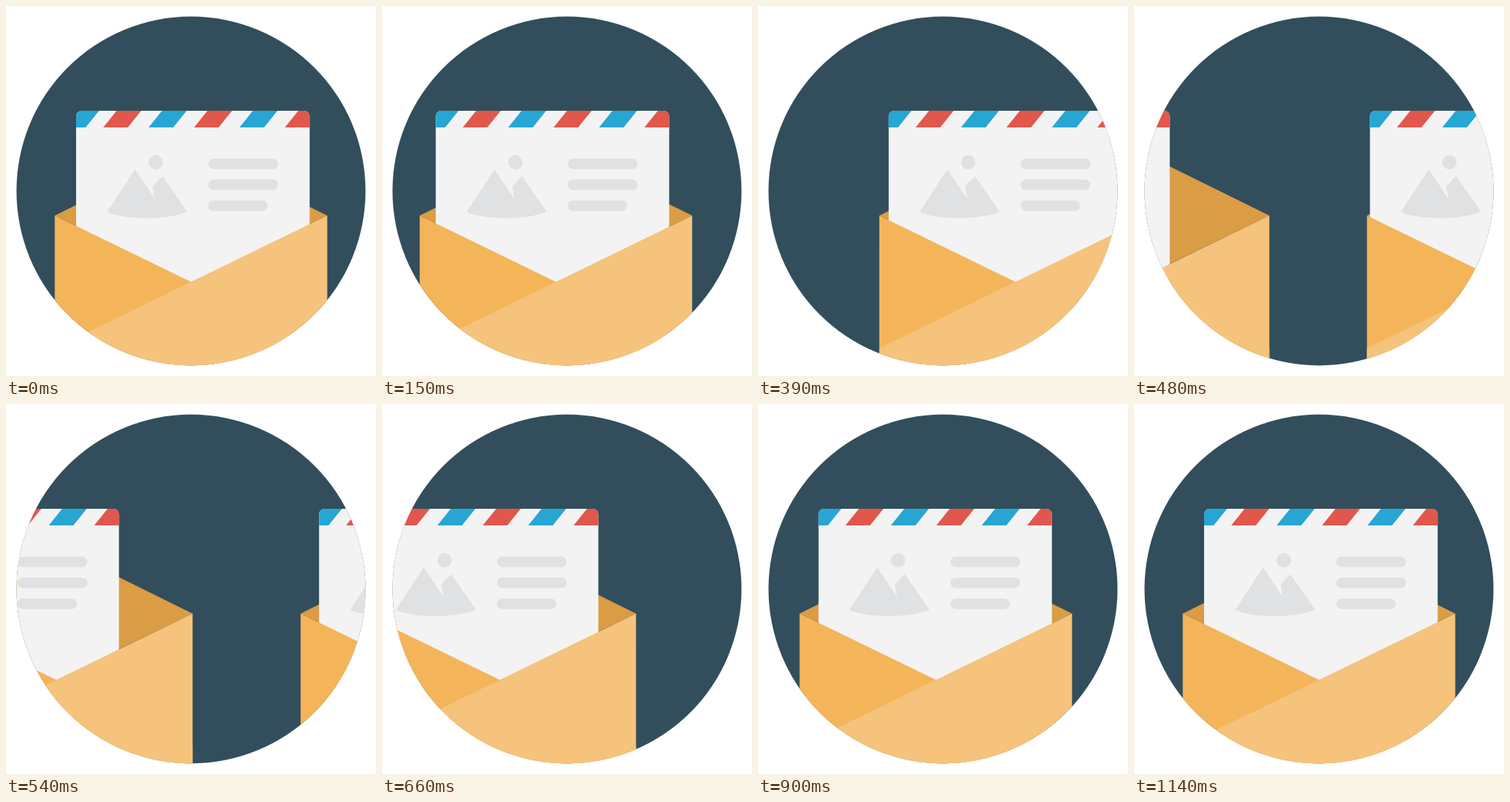
Recreate the animation shown at these times as an HTML page. Size 512x512 px, loop 2.14 s.

```html
<!DOCTYPE html>
<html lang="en">
<head>
<meta charset="utf-8">
<title>Letter in an envelope</title>
<style>
  html, body { margin: 0; width: 100%; height: 100%; overflow: hidden; background: #fff; }
  svg { display: block; width: 100%; height: 100%; }
</style>
</head>
<body>
<svg viewBox="0 0 512 512">
  <defs>
    <clipPath id="disc"><circle cx="256" cy="256" r="241.5"/></clipPath>
    <clipPath id="sheet"><path d="M97 400V153a8 8 0 0 1 8-8H412.2a8 8 0 0 1 8 8V400z"/></clipPath>
    <path id="back" fill="#da9c45" d="M67.5 290L256 197L444.5 290L256 381z"/>
    <g id="front">
      <path fill="#f4b459" d="M67.5 290L444.5 473.5V500H67.5z"/>
      <path fill="#f5c37b" d="M67.5 473.5L444.5 290V500H67.5z"/>
    </g>
    <g id="card">
      <g clip-path="url(#sheet)">
        <rect x="96" y="144" width="325" height="246" fill="#f3f3f3"/>
        <g id="stripes"></g>
      </g>
      <g id="print" fill="#dfe1e3">
        <circle cx="207.3" cy="216.2" r="10"/>
        <path d="M140 285L178.5 226L206 267L202.8 249.5L216.5 235.5L250.8 284.5Q232 293.3 195.5 293.3Q157 293.3 140 285z"/>
      </g>
    </g>
  </defs>
  <circle cx="256" cy="256" r="241.5" fill="#324e5c"/>
  <g clip-path="url(#disc)" id="scene"></g>
</svg>
<script>
const NS = 'http://www.w3.org/2000/svg';
const LOOP = 2140, STEP = 30, END = 1140;

function add(parent, tag, attrs = {}) {
  const el = document.createElementNS(NS, tag);
  for (const key in attrs) el.setAttribute(key, attrs[key]);
  return parent.appendChild(el);
}

// Progress along a cubic Bezier easing that ends at rest (y2 = 1)
function ease(x1, y1, x2) {
  const curve = (a, b, u) => 3 * u * (1 - u) ** 2 * a + 3 * u * u * (1 - u) * b + u ** 3;
  return x => {
    if (x <= 0 || x >= 1) return x <= 0 ? 0 : 1;
    let lo = 0, hi = 1;
    for (let i = 0; i < 24; i++) {
      const mid = (lo + hi) / 2;
      if (curve(x1, x2, mid) < x) lo = mid; else hi = mid;
    }
    return curve(y1, 1, lo);
  };
}

const move = (from, to, delay, time, easing) =>
  t => from + (to - from) * easing((t - delay) / time);

// The pair that leaves pulls back first; the pair that enters settles gently
const swing = ease(.6, -.272, .287);
const leave = {
  envelope: move(0, 523, 0, 1080, ease(.601, -.233, .196)),
  card: move(0, 600, 0, 1060, swing)
};
const enter = {
  envelope: move(-440, 0, 390, 645, ease(.08, .4, .35)),
  card: move(-600, 0, 0, 1060, swing)
};

const stripes = document.getElementById('stripes');
for (let i = 0; i < 6; i++) {
  const width = i ? 34 : 38.5;
  add(stripes, 'path', {
    d: `M${90.2 + 62.85 * i} 145h${width}l-18.5 23h${-width}z`,
    fill: i % 2 ? '#e2574c' : '#27a6d4'
  });
}

const print = document.getElementById('print');
for (let i = 0; i < 3; i++) {
  add(print, 'rect', {
    x: 279.8, y: 211.2 + 29 * i, width: i < 2 ? 96.6 : 82.2, height: 14.6, rx: 7.3
  });
}

const scene = document.getElementById('scene');
const layers = [leave, enter].flatMap(({ envelope, card }) => [
  ['back', envelope], ['card', card], ['front', envelope]
]).map(([id, path]) => ({ el: add(scene, 'use', { href: '#' + id }), path }));

function draw(ms) {
  const t = Math.min(END, Math.floor((ms % LOOP) / STEP) * STEP);
  for (const { el, path } of layers) {
    el.setAttribute('transform', `translate(${path(t).toFixed(2)} 0)`);
  }
}

const begin = performance.now();
function tick() {
  draw(performance.now() - begin);
  requestAnimationFrame(tick);
}
tick();
</script>
</body>
</html>
```
